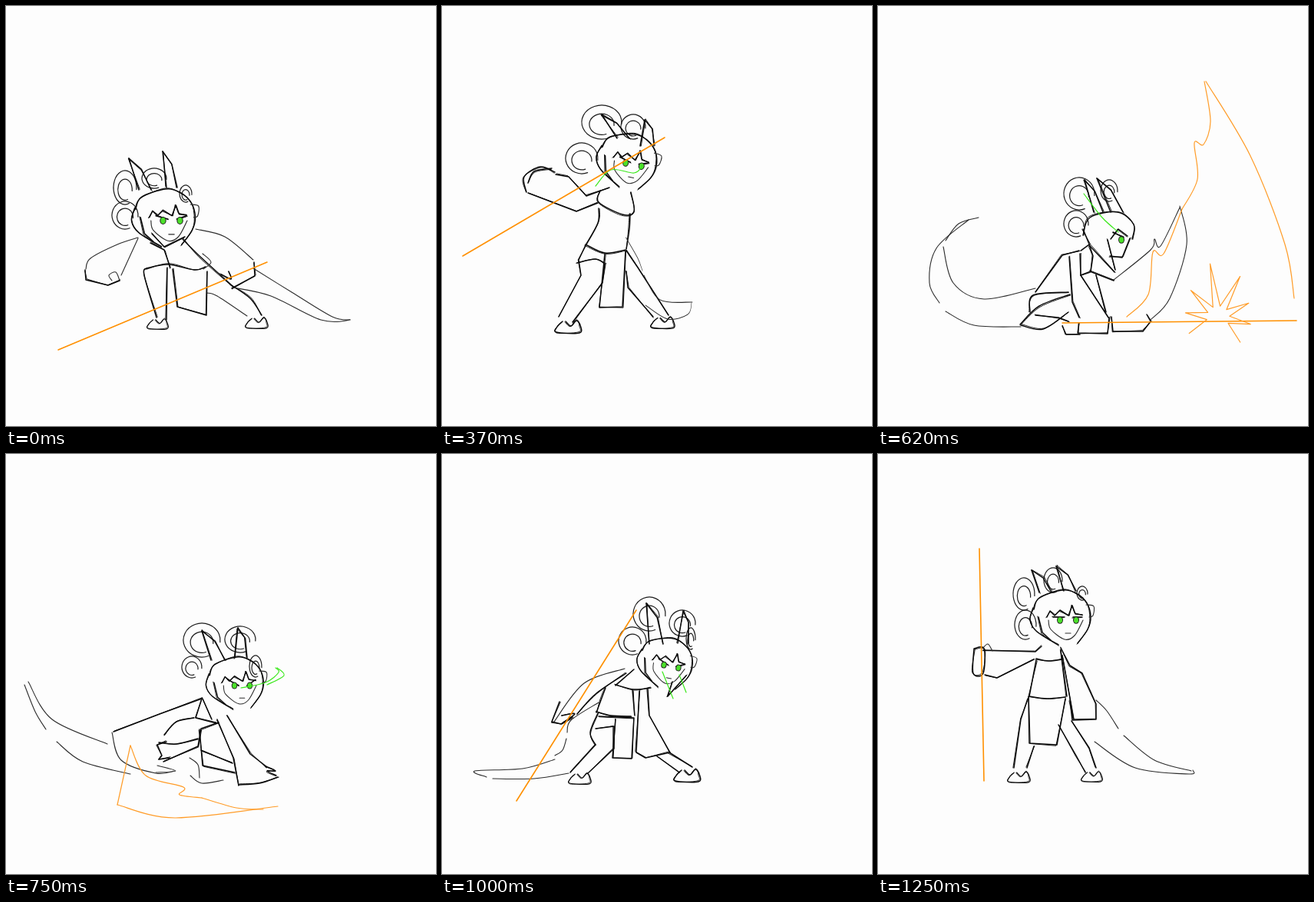
An HTML page with a canvas that plays this animation: 560 by 546 pixels, repeating every 1500 ms.

```html
<!DOCTYPE html>
<html>
<head>
<meta charset="utf-8">
<style>
html, body { margin: 0; height: 100%; overflow: hidden; background: #fdfdfd }
canvas { display: block }
</style>
</head>
<body>
<canvas width="560" height="546"></canvas>
<script>
const ctx = document.querySelector('canvas').getContext('2d');
ctx.lineCap = ctx.lineJoin = 'round';

function trace(pts, smooth) {
  ctx.beginPath();
  ctx.moveTo(...pts[0]);
  for (let i = 1; i < pts.length; i++) {
    const a = pts[i - 1], b = pts[i];
    if (!smooth) { ctx.lineTo(...b); continue; }
    const before = pts[i - 2] || a, after = pts[i + 1] || b;
    ctx.bezierCurveTo(a[0] + (b[0] - before[0]) / 6, a[1] + (b[1] - before[1]) / 6,
      b[0] - (after[0] - a[0]) / 6, b[1] - (after[1] - a[1]) / 6, ...b);
  }
  ctx.stroke();
}

// A rough pen adds a second, looser pass.
const pen = (color, width, smooth, rough) => (...n) => {
  const pts = [];
  for (let i = 0; i < n.length; i += 2) pts.push([n[i], n[i + 1]]);
  ctx.strokeStyle = color;
  ctx.lineWidth = width;
  trace(pts, smooth);
  if (!rough) return;
  ctx.lineWidth = .9;
  trace(pts.map(([x, y]) => [x + 1.3 * Math.sin(y * 5), y + 1.3 * Math.sin(x * 3)]), smooth);
};
const line = pen('#0a0a0a', 1.5, false, true);
const curve = pen('#0a0a0a', 1.5, true, true);
const thin = pen('#2c2c2c', 1.1, true);
const glow = pen('#3be81c', 1.2, true);
const staff = pen('#ff9000', 1.6);
const fire = pen('#ff9c28', 1.2, true);
const spike = pen('#ff9c28', 1.2);

function oval(x, y, rx, ry, color) {
  ctx.beginPath();
  ctx.ellipse(x, y, rx, ry, 0, 0, 7);
  ctx.fillStyle = color;
  ctx.fill();
}

function eye(x, y) {
  oval(x, y, 4, 4.8, '#222');
  oval(x, y, 3, 3.8, '#4be02a');
}

function ring(x, y, rx, ry) {
  ctx.strokeStyle = '#1c1c1c';
  ctx.lineWidth = 1.2;
  for (const k of [1, .62]) {
    ctx.beginPath();
    ctx.ellipse(x, y + ry * (1 - k) / 3, rx * k, ry * k, 0, 1.2, 6.4);
    ctx.stroke();
  }
}

function horn(x, y, bx, by, w) {
  line(x, y, bx - w, by);
  line(x, y, x + (bx - x) * .4 + w, y + (by - y) * .35, bx + w, by);
}

function cuff(x, y, w, h, tilt) {
  ctx.save();
  ctx.translate(x, y);
  ctx.rotate(tilt);
  curve(-w, -h, -w - 1, h, w, h, w + 1, -h, -w, -h);
  ctx.restore();
}

function foot(x, y, size) {
  ctx.save();
  ctx.translate(x, y);
  ctx.scale(size, size);
  curve(-8, -14, -15, -7, -16, 0, 14, 1, 15, -9, 10, -15, 3, -8, -4, -14);
  ctx.restore();
}

// Head seen from the front, centred between the eyes.
function face(x, y, tilt, size, anger) {
  ctx.save();
  ctx.translate(x, y);
  ctx.rotate(tilt);
  ctx.scale(size, size);
  curve(-44, -14, -37, -29, -7, -39, 11, -35, 25, -22, 30, -4, 26, 12, 13, 30);
  curve(-45, -16, -49, 0, -40, 15, -12, 32);
  line(-38, -4, -33, 16, -22, 26);
  thin(24, -20, 34, -18, 33, -6, 28, -4);
  line(-27, -4, -23, -12, -17, -6, -10, -13, 1, -6, 6, -19, 10, -8, 19, -7);
  thin(-25, 0, -22, 12, -4, 25, 9, 20, 20, 0);
  line(-19, -4 - anger, -4, -4 + anger);
  line(7, -4 + anger, 19, -4 - anger);
  thin(-3, 17, 4, 17);
  eye(-10, 0);
  eye(11, 0);
  ctx.restore();
}

const crouch = {
  head() {
    ring(155, 236, 15, 22); ring(193, 224, 16, 13); ring(234, 244, 8, 11); ring(155, 272, 17, 18);
    horn(160, 198, 181, 239, 8); horn(204, 189, 216, 236, 7);
    face(215, 279, 0, 1.05, 2);
    line(190, 296, 206, 313, 233, 300);
  },
  body() {
    thin(172, 301, 145, 310, 110, 328, 104, 342);
    line(103, 343, 104, 356, 133, 363, 148, 357);
    thin(138, 357, 134, 350, 143, 346, 148, 357);
    thin(150, 350, 172, 302);
    line(188, 308, 206, 317, 214, 340);
    curve(183, 341, 211, 336, 245, 343, 260, 339);
    curve(230, 303, 252, 325, 296, 365);
    thin(256, 322, 267, 333, 257, 342);
    thin(247, 290, 285, 300, 322, 330);
    line(323, 333, 324, 351, 294, 367);
    curve(280, 349, 293, 355, 290, 345);
    line(217, 342, 223, 391, 261, 402, 262, 345);
    curve(183, 341, 180, 350, 196, 405);
    line(210, 340, 209, 408);
    thin(262, 373, 275, 377, 314, 403);
    curve(292, 362, 318, 380, 333, 402);
    foot(198, 419, .8); foot(327, 418, .85);
  },
  tail() { thin(322, 341, 372, 372, 425, 404, 448, 408, 410, 408, 345, 377, 296, 366); },
  prop() { staff(68, 447, 340, 333); }
};

const lunge = {
  head() {
    ring(216, 149, 26, 22); ring(257, 155, 16, 16); ring(190, 196, 21, 20);
    horn(216, 139, 244, 170, 8); horn(272, 146, 275, 180, 9);
    face(257, 204, .2, 1, 2);
    glow(208, 232, 228, 211, 258, 215, 268, 207);
  },
  body() {
    line(113, 265, 184, 252, 228, 234);
    line(150, 286, 190, 264, 205, 256);
    cuff(131, 276, 20, 11, -.1); cuff(301, 224, 15, 10, -.2);
    curve(205, 256, 198, 275, 190, 300);
    curve(202, 254, 218, 249, 240, 250);
    line(238, 262, 233, 282, 238, 300);
    curve(189, 300, 210, 304, 240, 305);
    line(237, 238, 248, 250, 285, 227);
    line(236, 262, 275, 245, 285, 242);
    line(276, 224, 276, 248, 292, 240);
    line(190, 302, 192, 362, 227, 366, 239, 308);
    curve(186, 300, 183, 340, 187, 405);
    line(211, 366, 208, 404);
    curve(239, 308, 266, 352, 290, 402);
    line(232, 347, 256, 370, 277, 408);
    line(234, 328, 250, 326, 244, 310);
    foot(196, 420, 1); foot(287, 418, .85);
  },
  tail() {
    thin(241, 301, 272, 328, 284, 344);
    thin(288, 350, 330, 382, 414, 385);
    thin(292, 389, 350, 407, 402, 401, 412, 386);
  },
  prop() { staff(44, 305, 336, 215); }
};

const swing = {
  head() {
    ring(213, 146, 27, 21); ring(261, 158, 20, 17); ring(186, 197, 20, 21);
    line(226, 137, 254, 173, 268, 202);
    line(189, 157, 192, 170, 224, 162, 226, 145);
    curve(204, 190, 202, 208, 218, 234, 246, 242);
    line(206, 178, 244, 204, 247, 215);
    line(228, 207, 234, 228, 246, 240, 240, 212, 230, 207);
    line(257, 172, 288, 195, 296, 215, 283, 219);
    line(296, 216, 275, 251, 274, 235, 278, 221);
    line(264, 190, 274, 215, 256, 236);
    eye(269, 210);
  },
  body() {
    curve(110, 242, 107, 222, 128, 209, 147, 216);
    curve(112, 230, 120, 215, 143, 211);
    line(112, 243, 175, 267, 203, 256);
    line(148, 219, 165, 222, 188, 247, 218, 236);
    curve(206, 240, 204, 255, 235, 271, 250, 267, 246, 242);
    curve(204, 263, 203, 282, 187, 311);
    curve(245, 270, 244, 290, 240, 316);
    curve(187, 310, 212, 321, 239, 317);
    line(212, 322, 205, 392, 235, 391, 239, 318);
    line(187, 311, 178, 330, 181, 350, 152, 404);
    curve(176, 334, 200, 329, 213, 336);
    line(212, 336, 209, 360, 170, 411);
    line(240, 318, 255, 340, 295, 402);
    line(240, 345, 242, 366, 275, 404);
    foot(165, 424, 1); foot(288, 418, .9);
  },
  tail() {
    thin(194, 296, 140, 322, 104, 375, 142, 412);
    thin(182, 359, 148, 376, 155, 387, 190, 376);
    thin(186, 402, 235, 392);
  },
  prop() { staff(10, 345, 245, 128); }
};

const slam = {
  head() {
    ring(262, 244, 20, 21); ring(258, 283, 16, 17); ring(301, 240, 11, 14);
    horn(269, 226, 287, 268, 6); horn(285, 224, 311, 268, 8);
    curve(267, 298, 276, 275, 312, 268, 333, 284, 331, 303);
    line(267, 290, 276, 312, 308, 346);
    line(299, 304, 309, 343);
    line(328, 302, 318, 327, 302, 325);
    line(303, 303, 313, 290, 325, 299);
    line(306, 294, 320, 301);
    eye(317, 304);
    glow(268, 244, 292, 275, 313, 294);
  },
  body() {
    line(262, 318, 240, 324, 205, 372);
    line(249, 326, 253, 385, 262, 405);
    line(264, 318, 275, 310, 280, 325, 277, 345, 264, 350, 263, 322);
    line(276, 345, 307, 357);
    line(264, 350, 300, 405);
    line(284, 350, 297, 398);
    line(262, 412, 260, 425, 299, 426, 301, 405);
    line(304, 404, 306, 423, 345, 423, 355, 410, 350, 401);
    curve(185, 414, 210, 390, 250, 375);
    curve(198, 398, 202, 376, 248, 372);
    curve(186, 415, 215, 420, 248, 398);
    line(205, 402, 235, 405, 248, 410);
    line(240, 416, 245, 427, 263, 427);
  },
  tail() {
    thin(131, 275, 105, 283, 88, 305);
    thin(85, 313, 98, 360, 138, 381, 205, 367);
    thin(118, 278, 76, 315, 67, 360, 80, 386);
    thin(88, 397, 125, 415, 186, 417);
  },
  prop() {
    thin(393, 260, 402, 310, 380, 380, 355, 408);
    thin(393, 262, 368, 312, 360, 303, 355, 317, 307, 356);
    staff(240, 412, 545, 409);
    fire(427, 98, 485, 195, 530, 310, 542, 380);
    fire(425, 98, 433, 150, 424, 180, 412, 178, 416, 225, 396, 264);
    fire(396, 264, 372, 322, 358, 320, 352, 375, 324, 404);
    const burst = [];
    for (let i = 0; i < 15; i++) {
      const a = 3.64 - i * .32;
      const r = i % 2 ? 15 : 43 + 29 * Math.max(0, Math.sin(a)) ** 4;
      burst.push(443 + r * Math.cos(a), 405 - r * Math.sin(a));
    }
    spike(...burst);
  }
};

const sweep = {
  head() {
    ring(255, 242, 24, 22); ring(305, 241, 20, 17); ring(242, 277, 13, 14); ring(325, 276, 8, 14);
    horn(255, 230, 276, 268, 9); horn(302, 226, 306, 265, 8);
    face(307, 301, 0, .95, 4);
    glow(306, 304, 338, 297, 355, 284, 351, 278);
    glow(340, 300, 362, 288, 353, 278);
  },
  body() {
    line(140, 361, 200, 338, 255, 318);
    thin(138, 362, 150, 398, 195, 415, 220, 412);
    line(256, 318, 268, 345);
    line(255, 318, 247, 343, 274, 350);
    curve(206, 365, 222, 348, 245, 343);
    line(209, 374, 197, 378, 203, 392, 199, 397, 213, 395);
    curve(199, 375, 222, 377, 250, 370);
    line(205, 400, 250, 380, 254, 357, 277, 349);
    line(275, 345, 296, 395, 303, 431);
    line(288, 340, 318, 390, 340, 407);
    curve(303, 430, 330, 428, 354, 420);
    curve(338, 406, 351, 412, 340, 412, 352, 418);
    line(252, 358, 256, 405, 298, 414);
    line(254, 385, 295, 402);
    thin(240, 418, 255, 428, 283, 424);
    thin(197, 405, 221, 412, 195, 414);
    thin(239, 395, 250, 404, 252, 421);
  },
  tail() {
    thin(29, 296, 60, 345, 132, 377);
    thin(24, 300, 38, 335, 52, 358);
    thin(66, 374, 100, 400, 162, 416);
  },
  prop() {
    fire(162, 379, 145, 456);
    fire(145, 456, 220, 473, 354, 458);
    fire(162, 379, 182, 418, 231, 433, 226, 443, 255, 447);
    fire(255, 447, 300, 460, 335, 462);
  }
};

const recover = {
  head() {
    ring(270, 208, 21, 22); ring(313, 220, 17, 17); ring(248, 243, 18, 18); ring(324, 240, 6, 14);
    horn(266, 194, 279, 247, 9); horn(314, 204, 314, 246, 7);
    face(298, 276, .2, .92, 3);
    line(318, 288, 294, 315, 300, 296);
    glow(287, 283, 301, 318);
    glow(309, 287, 318, 310);
  },
  body() {
    thin(238, 279, 185, 298, 146, 348);
    curve(240, 285, 200, 312, 176, 338);
    line(153, 322, 143, 348, 155, 351, 170, 342);
    curve(156, 340, 173, 338, 158, 349);
    curve(226, 300, 250, 306, 272, 304);
    line(250, 280, 226, 301);
    curve(213, 304, 207, 320, 201, 336);
    curve(201, 335, 220, 340, 246, 341);
    line(248, 307, 251, 340);
    line(268, 305, 270, 340, 297, 388);
    line(257, 308, 253, 388, 265, 395, 297, 388);
    line(226, 345, 222, 395, 247, 396, 250, 343, 204, 341);
    curve(203, 337, 193, 362, 200, 378);
    line(200, 378, 167, 414);
    line(200, 357, 224, 354, 224, 383, 190, 415);
    line(296, 388, 326, 407);
    line(280, 393, 309, 414);
    foot(180, 428, .85); foot(320, 425, 1);
  },
  tail() {
    thin(204, 323, 168, 346, 163, 362);
    thin(162, 370, 157, 385, 147, 392);
    thin(147, 397, 105, 409, 43, 412, 58, 420);
    thin(66, 422, 120, 422, 165, 415);
  },
  prop() { staff(97, 451, 253, 203); }
};

const stand = {
  head() {
    ring(190, 182, 14, 21); ring(228, 164, 12, 16); ring(192, 222, 14, 19); ring(266, 181, 7, 9);
    horn(200, 151, 218, 180, 8); horn(232, 146, 250, 178, 8);
    face(247, 216, 0, 1, 0);
  },
  body() {
    line(137, 255, 205, 257, 213, 250);
    line(139, 287, 155, 291, 203, 267);
    cuff(131, 269, 6, 16, 0);
    thin(136, 253, 143, 247, 149, 256);
    curve(206, 266, 222, 269, 240, 267);
    line(206, 268, 197, 315);
    line(238, 255, 246, 315);
    curve(197, 315, 220, 318, 244, 316);
    line(238, 252, 250, 275, 266, 285, 284, 325, 284, 345, 253, 346, 250, 320);
    line(240, 262, 255, 345);
    line(196, 316, 197, 376, 233, 378, 244, 318);
    line(195, 318, 186, 345, 177, 408);
    line(203, 380, 194, 408);
    line(235, 352, 258, 392, 270, 414);
    line(252, 347, 275, 382, 284, 408);
    foot(184, 426, .85); foot(279, 425, .8);
  },
  tail() {
    thin(284, 320, 298, 334, 313, 357);
    thin(320, 366, 360, 398, 408, 412);
    thin(282, 374, 335, 408, 405, 416, 410, 411);
  },
  prop() { staff(132, 123, 138, 425); }
};

const midSwing = { ...swing, head: lunge.head, tail: lunge.tail, prop: () => staff(27, 325, 290, 171) };
const rising = { ...stand, prop: () => staff(112, 438, 162, 155) };

// Start time, pose, then scale x, scale y, shift x, shift y of moved parts.
const frames = [
  [0, crouch],
  [120, lunge, { head: [1, 1, -6, 31], body: [1, .82, 0, 76] }],
  [250, lunge],
  [370, midSwing, { head: [1, 1, -8, 2], tail: [.5, 1, 119, 0] }],
  [500, swing],
  [620, slam],
  [750, sweep],
  [870, recover, { head: [1, 1, 2, 16], body: [1, .87, 0, 55] }],
  [1000, recover],
  [1120, rising, { head: [1, 1, 6, 12], body: [1, .93, 0, 30], tail: [.5, .93, 142, 30], prop: [1, 1, 0, 0] }],
  [1250, stand]
];

function draw() {
  const now = performance.now() % 1500;
  const [, pose, moves = {}] = frames.findLast(f => f[0] <= now);
  ctx.setTransform(1, 0, 0, 1, 0, 0);
  ctx.fillStyle = '#fdfdfd';
  ctx.fillRect(0, 0, 560, 546);
  for (const part in pose) {
    const [sx, sy, dx, dy] = moves[part] || moves.body || [1, 1, 0, 0];
    ctx.setTransform(sx, 0, 0, sy, dx, dy);
    pose[part]();
  }
  requestAnimationFrame(draw);
}
draw();
</script>
</body>
</html>
```
